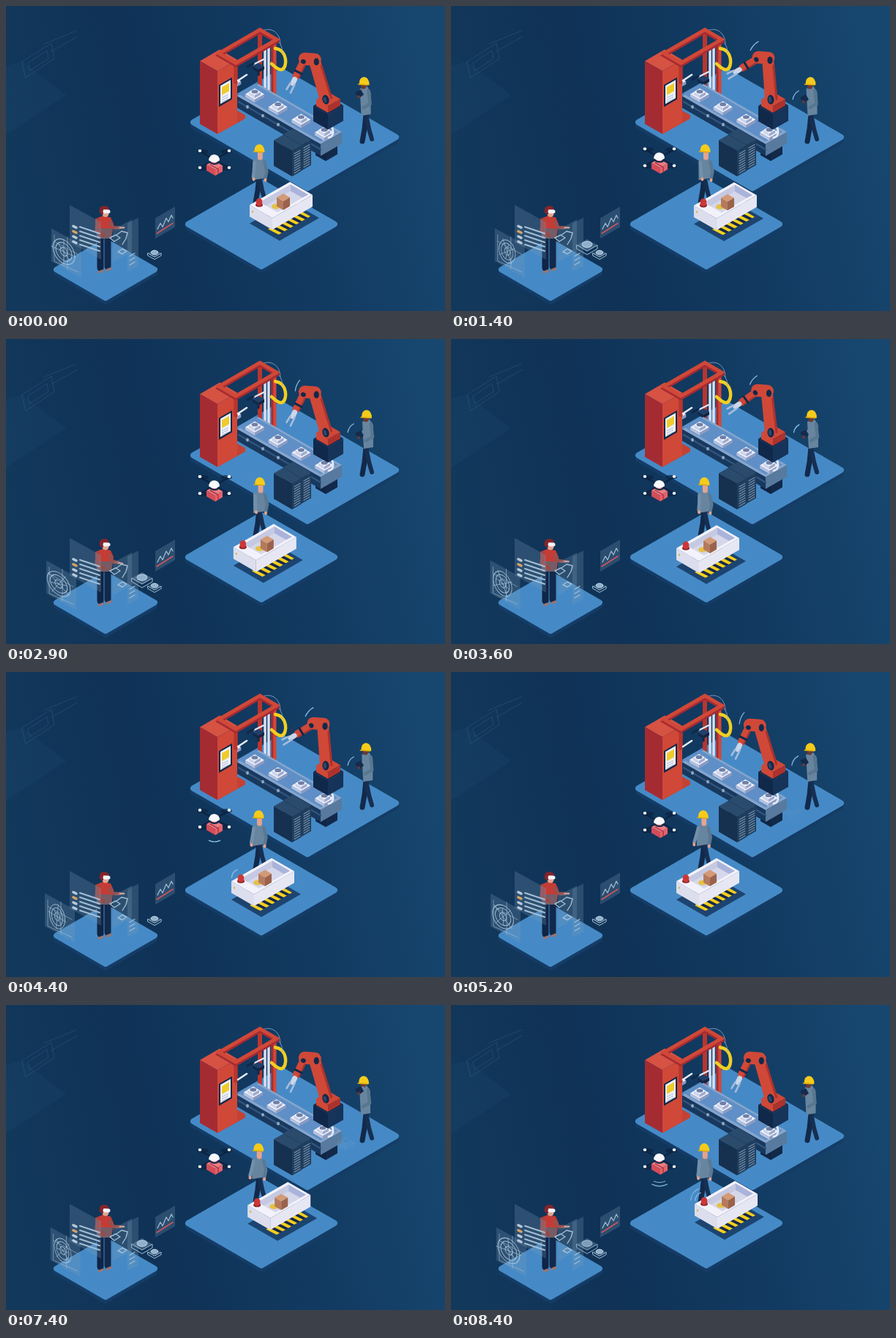
Write an HTML page that moves like this. It is 600x417 px and loops after 8.5 s.

```html
<!DOCTYPE html>
<html lang="en">
<head>
<meta charset="utf-8">
<title>Smart factory</title>
<style>
html, body { margin: 0; width: 100%; height: 100%; overflow: hidden; background: #10355a; }
svg { display: block; width: 100vw; height: 100vh; }
</style>
</head>
<body>
<svg id="stage" viewBox="0 0 600 417" preserveAspectRatio="none"></svg>
<script>
const LOOP = 8500;
const SLOPE = .577;
const stage = document.getElementById('stage');

// Markup helpers
const poly = (points, fill, extra = '') => `<polygon points="${points}" fill="${fill}" ${extra}/>`;
const line = (d, color, width = 1, extra = '') =>
  `<path d="${d}" fill="none" stroke="${color}" stroke-width="${width}" stroke-linecap="round" stroke-linejoin="round" ${extra}/>`;
const oval = (x, y, rx, ry, fill, extra = '') =>
  `<ellipse cx="${x}" cy="${y}" rx="${rx}" ry="${ry}" fill="${fill}" ${extra}/>`;
const group = (id, body) => `<g id="${id}">${body}</g>`;
const repeat = (n, draw) => Array.from({ length: n }, (_, i) => draw(i)).join('');

// Isometric shapes: (x, y) is the near corner, a runs up-left, b runs up-right
const corners = (x, y, a, b) => [
  [x, y], [x - a, y - a * SLOPE], [x + b - a, y - (a + b) * SLOPE], [x + b, y - b * SLOPE]];
const flat = (x, y, a, b, fill, extra) => poly(corners(x, y, a, b).join(' '), fill, extra);
const box = (x, y, a, b, h, [top, left, right]) => {
  const [near, west, , east] = corners(x, y, a, b);
  const wall = (p, fill) => poly([near, p, [p[0], p[1] + h], [x, y + h]].join(' '), fill);
  return flat(x, y, a, b, top) + wall(west, left) + wall(east, right);
};
const platform = (x, y, a, b) => ['#143c66', '#458ac6'].map((color, i) =>
  flat(x, y + 5 - 5 * i, a, b, color, `stroke="${color}" stroke-width="8" stroke-linejoin="round"`)).join('');

const RED = '#d04838', CRIMSON = '#a52b33', NAVY = '#12294a', STEEL = '#6885a0', SKIN = '#e4a38e';

const backdrop = `
  <defs>
    <linearGradient id="bg" x1="0" y1=".45" x2="1" y2=".3">
      <stop offset="0" stop-color="#12385c"/><stop offset=".3" stop-color="#0f3256"/>
      <stop offset=".62" stop-color="#123a61"/><stop offset="1" stop-color="#17476f"/>
    </linearGradient>
    <clipPath id="stripeArea">${flat(372, 313, 14, 44, '#000')}</clipPath>
  </defs>
  <rect width="600" height="417" fill="url(#bg)"/>
  ${poly('0,82 22,76 82,122 0,176', '#1b4568', 'opacity=".4"')}
  <g opacity=".3">${line('M22 76L62 51L66 72L27 98ZM30 78L56 61L58 72L33 88ZM52 52L96 34M62 62L97 42', '#457596')}</g>`;

const workpiece = box(0, 8, 13, 13, 4, ['#eef0fa', '#b7c1de', '#8d9bc2']) +
  box(0, 2, 8, 8, 4, ['#f5f6fc', '#ccd4ea', '#9eaacd']) + oval(0, -3, 4.5, 2.6, '#7080a8');

const machineBack =
  line('M347 38V110', '#b9352e', 6) + line('M354 56V112M359 54V116', '#d9dff2', 3.5) +
  line('M366 48V123', RED, 7) + line('M364 50V123', CRIMSON, 2.5) +
  line('M368 58C385 60 385 84 377 87C371 88 367 82 363 79', '#f0cf22', 4.5) +
  line('M350 34C362 28 375 36 375 52M370 46C376 52 378 58 378 64', '#8eaed0', .8);

const press = box(345, 87, 8, 8, 4, ['#20406a', NAVY, '#0d2340']) +
  line('M338 80L352 73', '#e0e6f4', 2.2) + line('M345 88V94M330 83L338 79', NAVY, 3.2);

const conveyor =
  box(437, 194, 14, 16, 18, [NAVY, '#0f2545', NAVY]) +
  box(430, 189, 114, 29, 16, ['#86a5cc', '#18385e', '#587a9e']) +
  flat(430, 185, 113, 23, '#5f8fc6') + line('M430 196L318 131', '#31557d', 2.5) +
  repeat(5, i => oval(330 + i * 21, 138 + i * 12.1, 2, 2.4, '#8da7c4'));

const cabinet = (x, y) => box(x, y, 25, 13, 35, ['#2b4b6d', '#16304f', '#1f3d5d']) +
  repeat(9, i => line(`M${x + 3} ${y + 4 + i * 3.3}l8 -4.6`, '#7893ae', 1.1));

const machineFront =
  poly('289,160 316,143 327,149 327,154 289,175', '#c34235') +
  box(289, 89, 24, 27, 86, ['#d65243', CRIMSON, RED]) +
  box(291, 108, 0, 18, 30, [NAVY, NAVY, NAVY]) + box(293, 109, 0, 14, 25, ['#fff', '#fff', '#eef1fa']) +
  box(295, 111, 0, 10, 11, ['#fff', '#fff', '#f0cb2c']) +
  repeat(3, i => line(`M296 ${125 + i * 3}l8 -4`, '#8c9dbd', 1, 'stroke-dasharray="1.2 2"')) +
  line('M314 78V104', '#b9352e', 5.5) +
  flat(314, 79, 23, 56, 'none', `stroke="${CRIMSON}" stroke-width="5" transform="translate(0 2)"`) +
  flat(314, 78, 23, 56, 'none', `stroke="${RED}" stroke-width="5"`) +
  line('M317 102L329 94', '#e8ebf6', 2.6);

const robotBase = box(440, 148, 20, 21, 21, [NAVY, '#10284a', '#16335a']) +
  box(440, 137, 16, 17, 9, [RED, RED, '#ac322d']);
const upperArm = line('M0 0L0 -52', RED, 16) + line('M7 -46L8 0', '#ac322d', 3) +
  oval(0, 0, 4.5, 6.5, NAVY) + oval(-1, 0, 2, 4, '#2c486d');
const armHead = line('M-13 -1L1 0', RED, 17) + oval(3, 3, 3.6, 5, NAVY);
const foreArm = line('M0 0L24 0', RED, 10) + line('M6 -4L24 -4', '#ac322d', 2) + oval(2, 0, 3, 3.5, NAVY) +
  line('M18 -5V5', NAVY, 3) + line('M29 0L35 0', '#ccd7ea', 7) +
  line('M35 -3L48 -3M36 3L46 4', '#a9bbd8', 2.6);

const helmet = (x, y) =>
  `<path d="M${x - 7} ${y + 5}q0 -11 7 -11q7 1 7 11z" fill="#f5cb1b"/>` + line(`M${x - 8} ${y + 4}l13 1`, '#dba90c', 1.5);
const legs = (x, y) => line(`M${x} ${y}l-2 20l-3 17`, NAVY, 7) + line(`M${x} ${y}l4 20l4 14`, '#162f52', 6);

const inspectorBody = poly('484,113 494,110 499,118 499,148 486,150', STEEL) +
  line('M496 116L498 134L489 139', '#58778f', 4.5) + line('M489 106V110', '#6b3a35', 7) + helmet(490, 103);
const tablet = line('M487 119L482 125', STEEL, 4) + poly('476,121 484,117 488,124 481,129', '#142b4c') + oval(481, 127, 2, 2, '#6b3a35');

const walkerBody = poly('338,211 347,207 355,211 357,235 338,238', STEEL) +
  line('M354 213L357 226L355 236', '#5a7893', 4.5) + oval(355, 238, 2, 2.5, SKIN) +
  line('M348 202V207', SKIN, 7) + helmet(347, 195);
const walkerArm = line('M340 214L337 226L335 233', '#7390aa', 4.5) + oval(335, 236, 2, 2.5, SKIN);

const cart =
  flat(374, 321, 41, 54, '#1d4470') +
  `<g clip-path="url(#stripeArea)">${flat(374, 314, 18, 48, '#17284a')}${
    repeat(7, i => line(`M${358 + i * 8} ${303 - i * 4.6}l20 10`, '#f2cf1e', 4))}</g>` +
  box(364, 290, 31, 55, 16, ['#f3f2fa', '#dddeed', '#e7e7f4']) +
  flat(371, 282, 24, 42, '#d5d7ea') +
  poly('389,244 413,258 405,262 389,253', '#aab3da') + poly('347,268 389,244 389,253 355,273', '#c5c9e2') +
  oval(369, 274, 6, 3.5, '#e5c145') +
  box(379, 267, 9, 9, 12, ['#d39a76', '#b57a5c', '#9b624b']) +
  oval(346, 272, 5, 2.8, '#8e2428') + line('M346 267V269', '#cb3838', 8.5) +
  oval(337, 281, 1.2, 1.5, '#d8b64a');

const drone =
  line('M265 199L305 221M305 199L265 221', '#0c2443', 2.4) +
  repeat(4, i => {
    const x = i % 2 ? 305 : 265, y = i < 2 ? 198 : 221;
    return oval(x + (285 - x) / 5, y + 1, 8, 3, '#0b2341', 'opacity=".7"') + oval(x, y, 2.3, 2.1, '#f2f5fb');
  }) +
  box(286, 224, 12, 10, 8, ['#ec7c80', '#d44d59', '#e4626a']) + line('M279 217L290 223V229', '#a52f40', 1.3) +
  `<path d="M277 211q1 -8 8 -8q7 1 7 8q-7 6 -15 0z" fill="#f8f9fd"/>` + line('M279 214q6 4 12 0', NAVY, 2);

const panel = (x, y, w, h, slope) =>
  poly([[x, y], [x + w, y + w * slope], [x + w, y + w * slope + h], [x, y + h]].join(' '), '#7c9ab5', 'opacity=".26"');
const glow = (d, width = 1, extra = '') => line(d, '#a3bfd5', width, extra);
const ring = r => oval(0, 0, r, r * 1.08, 'none', 'stroke="#a3bfd5"');
const gearPanel = panel(62, 304, 41, 45, .55) +
  glow('M66 313V349L99 364M66 322L99 340M84 316V360', .6) +
  group('gear', [15, 11, 5].map(ring).join('') + glow('M-17 0H17M0 -17V17M-8 -8L8 8', .7));
const textPanel = panel(87, 272, 43, 51, .55) +
  repeat(5, i => glow(`M101 ${302 + i * 6}l27 9`, 2)) +
  repeat(4, i => line(`M92 ${301 + i * 7}l4 2`, i === 1 ? '#d8a263' : '#b9cadb', 3.5));
const toolPanel = panel(166, 297, 15, 66, -.5) + panel(146, 306, 26, 44, -.54) +
  glow('M142 317l8-4 6 4-8 5zM151 313l7-5 8 2-2 8-5 8M153 336l6-4 6 3-6 4z', 1.4) +
  repeat(3, i => glow(`M169 ${342 + i * 6}l7 -4`, 1.2));
const chartPanel = panel(204, 290, 27, 28, -.58) +
  glow('M207 305l4-8 3 5 5-12 3 5 4-9 2 4', 1.2) + line('M206 311L228 297', '#d2555e', 1.5);
const wirePart = (x, y, s) => flat(x, y + 8 * s, 14 * s, 14 * s, '#7fa0bd', 'opacity=".4"') +
  glow(`M${x - 14 * s} ${y}l${14 * s} ${8 * s}l${14 * s} ${-8 * s}v${5 * s}l${-14 * s} ${8 * s}l${-14 * s} ${-8 * s}z`) +
  oval(x, y - 1, 7 * s, 4.2 * s, '#8fb0cb', 'stroke="#c1d6e8"');

const visitor =
  line('M129 316L129 358', '#0e2545', 9) + line('M139 316L139 356', NAVY, 9) +
  line('M127 364l5-2M138 361l5-2', '#9b7470', 3) +
  poly('122,291 132,287 143,289 147,298 144,318 125,318', '#c43c35') +
  poly('122,304 145,304 144,318 125,318', '#755c66') + line('M125 293L124 307L133 313', '#9c4846', 5) +
  line('M136 281V284', SKIN, 9) +
  `<path d="M128 283q-2 -10 7 -10q6 1 6 6l-8 -1v7z" fill="#82252c"/>` + line('M135 281h5', '#f2f4fa', 5);
const pointingArm = line('M142 296L147 303L155 303', '#95514f', 4.5) + line('M156 303L161 303', SKIN, 2.6);

const waves = ['robotWave', 'tabletWave', 'droneWave', 'droneEcho', 'lampWave', 'lampEcho'];

stage.innerHTML = backdrop +
  platform(412, 249, 156, 121) + platform(349, 356, 100, 100) + platform(136, 399, 67, 67) +
  machineBack + group('press', press) + conveyor +
  repeat(5, i => group('part' + i, workpiece)) +
  line('M441 163C449 165 449 179 441 180', '#e4e9f5', 3) +
  machineFront + cabinet(404, 190) + cabinet(391, 198) + robotBase +
  group('upper', upperArm) + group('head', armHead) + group('fore', foreArm) +
  legs(492, 148) + group('inspector', inspectorBody) + group('tablet', tablet) +
  legs(346, 232) + group('walker', walkerBody + group('walkerArm', walkerArm)) +
  group('cart', cart) + group('drone', drone) +
  visitor + group('pointing', pointingArm) +
  group('gearPanel', gearPanel) + textPanel + toolPanel + chartPanel +
  wirePart(203, 338, .65) + group('wirePart', wirePart(186, 327, 1)) +
  waves.map(id => line('', '#8fc1ea', 1.3, `id="${id}"`)).join('');

// Motion helpers
const el = Object.fromEntries([...stage.querySelectorAll('[id]')].map(node => [node.id, node]));
const place = (id, transform) => el[id].setAttribute('transform', transform);
const fade = (id, opacity) => el[id].setAttribute('opacity', opacity);
const clamp = u => Math.max(0, Math.min(1, u));
const smooth = u => (1 - Math.cos(Math.PI * clamp(u))) / 2;
const easeOut = u => 1 - (1 - clamp(u)) ** 3;
const mix = (a, b, u) => a + (b - a) * u;
// Rises to 1 around a centre and falls back, with eased ramps
const bump = (t, centre, reach, ramp) => smooth((reach - Math.abs(t - centre)) / ramp);
// Swings between -1 and 1 once per loop
const swing = (t, peak) => Math.cos(2 * Math.PI * (t - peak) / LOOP);

const LIFTS = [1350, 4100, 6400];

function wave(id, [x, y], angle, spread, r, u) {
  const visible = r > 2 && u >= 0 && u < 1;
  fade(id, visible ? 1 - u ** 4 : 0);
  if (!visible) return;
  const point = a => `${x + r * Math.cos(a * Math.PI / 180)} ${y + r * Math.sin(a * Math.PI / 180)}`;
  el[id].setAttribute('d', `M${point(angle - spread)}A${r} ${r} 0 0 1 ${point(angle + spread)}`);
}

function drawRobot(t) {
  const lift = Math.max(...LIFTS.map(c => bump(t, c, 1000, 650)));
  const lean = mix(-16, -4, lift), rad = lean * Math.PI / 180;
  const elbow = [437 + 57 * Math.sin(rad), 128 - 57 * Math.cos(rad)];
  place('upper', `translate(437 128) rotate(${lean})`);
  place('head', `translate(${elbow})`);
  place('fore', `translate(${elbow[0] - 14} ${elbow[1] + 1}) rotate(${mix(116, 149, lift)})`);
  return { elbow, lift };
}

function drawBelt(t) {
  const travel = LIFTS.reduce((sum, c) => sum + easeOut((t - c - 350) / 1100), 0);
  for (let i = 0; i < 5; i++) {
    const slot = i - 1 + travel % 1;
    place('part' + i, `translate(${340 + 31.7 * slot} ${120 + 17.4 * slot})`);
    fade('part' + i, clamp(4 - slot));
  }
  place('press', `translate(0 ${17 * bump((t + 900) % 2300, 0, 450, 300) + 17 * bump((t + 900) % 2300, 2300, 450, 300)})`);
}

function draw(t) {
  const { elbow, lift } = drawRobot(t);
  drawBelt(t);

  const drive = bump(t, 4500, 3400, 2300), lamp = [346 - 25 * drive, 268 + 14 * drive];
  const rise = -10 * bump(t, 3500, 3000, 2600), parcel = [285, 224 + rise];
  place('cart', `translate(${-25 * drive} ${14 * drive})`);
  place('drone', `translate(0 ${rise})`);

  place('walker', `translate(${1.5 * swing(t, 1800) - 1} 0)`);
  place('walkerArm', `rotate(${-8 - 12 * swing(t, 1900)} 341 213)`);
  place('inspector', `translate(${1 + 2 * swing(t, 3200)} 0)`);
  place('tablet', `translate(1 ${1 + 7 * swing(t, 2900)})`);
  place('pointing', `rotate(${13 * bump(t, 2900, 1000, 800)} 142 296)`);

  const slide = 4.5 * (swing(t, 0) - 1);
  place('gearPanel', `translate(${slide} ${slide / 6})`);
  place('gear', `translate(79 336) skewY(24) scale(${.85 + .15 * Math.cos(6 * Math.PI * t / LOOP)} 1) rotate(${360 * t / LOOP})`);
  fade('wirePart', bump(t, 2000, 1500, 400) + bump(t, 7300, 1400, 400));

  const busy = t > 1000 && t < 7250 ? (t - 275) % 750 / 750 : -1;
  wave('robotWave', elbow, mix(203, 222, lift), 18, 17 + 18 * busy, busy);
  wave('tabletWave', [483, 130], 215, 26, 6 + 20 * busy, busy);

  const call = (t + 3300) % 3750 / 700;
  wave('droneWave', parcel, 90, 26, 12 + 18 * call, call);
  wave('droneEcho', parcel, 90, 24, call > .4 ? 7 + 18 * call : 0, call);
  wave('lampWave', lamp, 215, 32, 8 + 16 * call, call);
  wave('lampEcho', lamp, 215, 32, call > .4 ? 2 + 16 * call : 0, call);
}

function tick() {
  draw(performance.now() % LOOP);
  requestAnimationFrame(tick);
}
tick();
</script>
</body>
</html>
```
